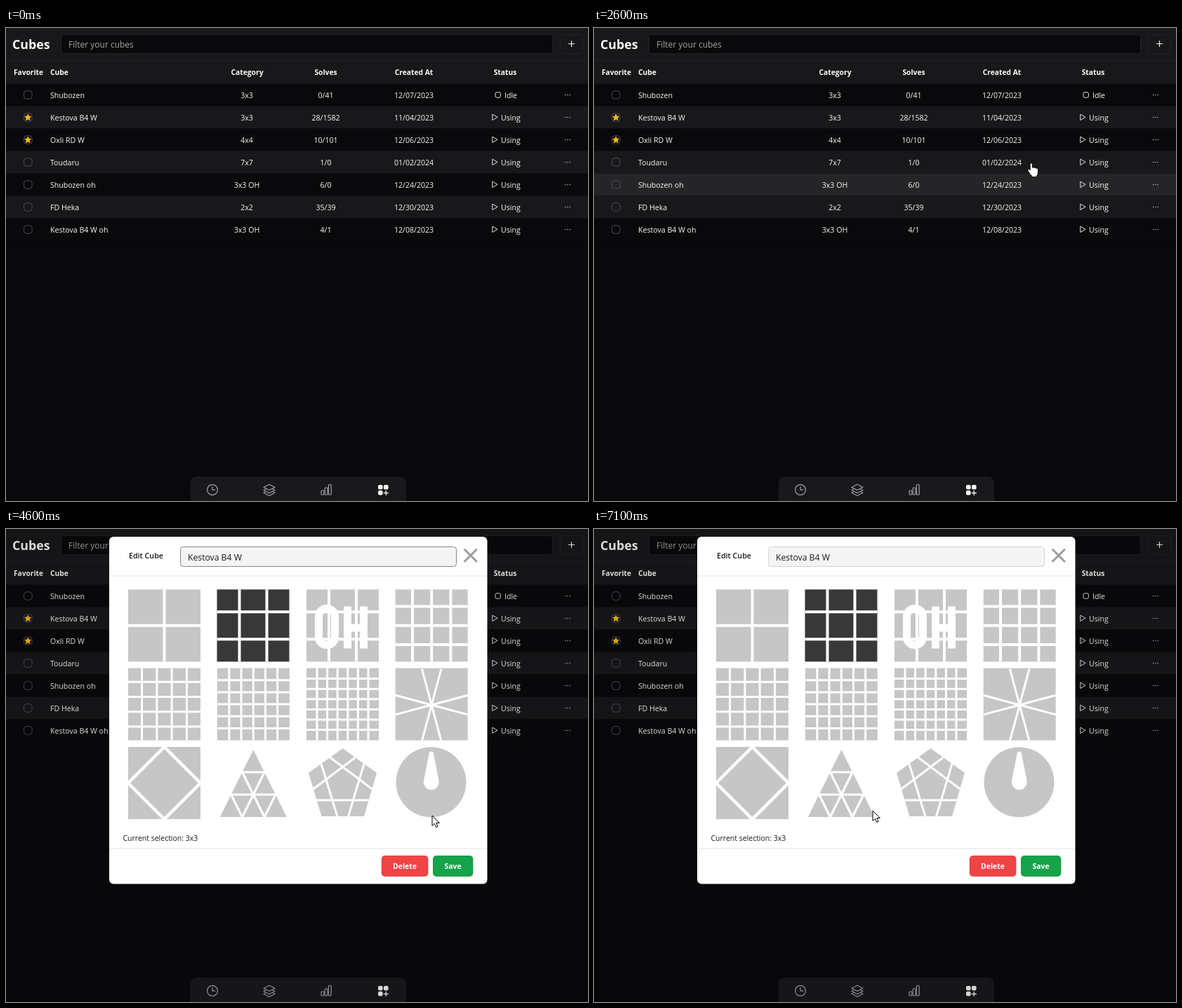
These frames come from a looping animation (829 by 675 pixels, 7200 ms). An HTML page:

```html
<!DOCTYPE html>
<html lang="en">
<head>
<meta charset="utf-8">
<title>Cubes</title>
<style>
  html, body { margin: 0; width: 100%; height: 100%; overflow: hidden; background: #09090b; }
  svg { display: block; }
  text { font-family: "Open Sans", "Noto Sans", sans-serif; font-weight: 500; fill: #fafafa; white-space: pre; }
  .thin { font-weight: 400; }
  .b { font-weight: 600; }
  .bb { font-weight: 700; }
  .mid { text-anchor: middle; }
  .end { text-anchor: end; }
  .dark text { fill: #18181b; font-weight: 400; }
  .dark .b { font-weight: 600; }
  .dark .light { fill: #fff; font-weight: 700; }
  .mono { font-family: "DejaVu Sans Mono", monospace; }
  .line { fill: none; stroke-linecap: round; stroke-linejoin: round; }
  .gap { fill: none; stroke: #fff; }
  .tile { fill: #c6c6c6; }
</style>
</head>
<body>
<svg id="stage" width="829" height="675" viewBox="0 0 829 675">
  <g id="page"></g>
  <rect id="dim" width="829" height="675"/>
  <g id="modal" class="dark"></g>
  <g id="alert" class="dark"></g>
  <g id="cursor"></g>
</svg>
<script>
const $ = id => document.getElementById(id);
const LOOP = 7200, STEP = 100;
const NAME = 'Kestova B4 W';

// --- markup helpers ---
const rect = (x, y, w, h, fill, r = 0, more = '') =>
  `<rect x="${x}" y="${y}" width="${w}" height="${h}" rx="${r}" fill="${fill}" ${more}/>`;
const text = (x, y, s, cls = '', size = 10.6, more = '') =>
  `<text x="${x}" y="${y}" class="${cls}" style="font-size:${size}px" ${more}>${s}</text>`;
const line = (d, color, w = 1, more = '') =>
  `<path class="line" d="${d}" stroke="${color}" stroke-width="${w}" ${more}/>`;
const gap = (d, w) => `<path class="gap" d="${d}" stroke-width="${w}"/>`;
const shape = pts => `<polygon class="tile" points="${pts.join(' ')}"/>`;
const mix = (a, b, k) => a.map((v, i) => v + (b[i] - v) * k);

// --- table page ---
const ROW_TOP = 79.5, ROW_H = 32;
const rowFill = i => i % 2 ? '#18181b' : '#09090b';
const cubes = [
  ['Shubozen', '3x3', '0/41', '12/07/2023'],
  [NAME, '3x3', '28/1582', '11/04/2023', true],
  ['Oxli RD W', '4x4', '10/101', '12/06/2023', true],
  ['Toudaru', '7x7', '1/0', '01/02/2024'],
  ['Shubozen oh', '3x3 OH', '6/0', '12/24/2023'],
  ['FD Heka', '2x2', '35/39', '12/30/2023'],
  [NAME + ' oh', '3x3 OH', '4/1', '12/08/2023'],
];

function star(cx, cy, r) {
  const pts = Array.from({ length: 10 }, (_, k) => {
    const a = k * Math.PI / 5 - Math.PI / 2, q = k % 2 ? r * 0.48 : r;
    return (cx + q * Math.cos(a)).toFixed(2) + ',' + (cy + q * Math.sin(a)).toFixed(2);
  });
  return `<polygon points="${pts.join(' ')}" fill="#f2b90c" stroke="#f2b90c" stroke-linejoin="round"/>`;
}

function tableRow([name, category, solves, date, fav], i) {
  const y = ROW_TOP + ROW_H * i, c = y + 16, base = c + 4;
  const dots = [-3.3, 0, 3.3].map(d => `<circle cx="${800 + d}" cy="${c}" r=".8" fill="#b4b4bb"/>`).join('');
  return rect(0, y, 829, ROW_H, rowFill(i), 0, `id="row${i}"`)
    + rect(25.5, c - 5.8, 11.6, 11.6, 'none', 4, 'stroke="#4b4b52"')
    + (fav ? star(31.2, c + .3, 4.6) : '')
    + text(63, base, name)
    + text(343, base, category, 'mid') + text(455.5, base, solves, 'mid') + text(581, base, date, 'mid')
    + (i ? line(`M692.8 ${c - 4}v8l7-4z`, '#e4e4e7') + text(705, base, 'Using')
         : rect(697, c - 3.7, 7.4, 7.4, 'none', 1.8, 'stroke="#e4e4e7"') + text(710, base, 'Idle'))
    + rect(787, c - 10, 26, 20, '#484850', 5, `id="more${i}" visibility="hidden"`)
    + dots;
}

function navBar() {
  const gray = '#a1a1aa';
  const bars = [[449, 660, 6], [454.2, 656, 10], [459.4, 651.5, 14.5]]
    .map(([x, y, h]) => rect(x, y, 3.8, h, 'none', 1, `stroke="${gray}" stroke-width="1.2"`)).join('');
  const blocks = [[530, 652], [538, 652], [530, 660]].map(([x, y]) => rect(x, y, 6.6, 6.6, '#f4f4f5', 2)).join('');
  return '<path d="M262.5 675V651q0-11 11-11H559q11 0 11 11V675z" fill="#19191c"/>'
    + `<circle cx="294" cy="659" r="7.4" fill="none" stroke="${gray}" stroke-width="1.2"/>`
    + line('M294 654.5v4.7h3.8', gray, 1.2)
    + line('M375 651.2l8 4.2-8 4.2-8-4.2zM370 658.1l-3 1.5 8 4.2 8-4.2-3-1.5M370 661.6l-3 1.6 8 4.2 8-4.2-3-1.6', gray, 1.1)
    + bars + blocks + line('M541.3 660.5v6M538.3 663.5h6', '#f4f4f5', 1.3);
}

$('page').innerHTML = rect(0, 0, 829, 675, '#09090b') + rect(0, 0, 829, 80, '#18181b')
  + rect(0, 46, 829, 1, '#232327')
  + text(9, 30, 'Cubes', 'bb', 17.8)
  + rect(78.5, 9.5, 700, 27, '#09090b', 4, 'stroke="#222226"')
  + text(89, 28, 'Filter your cubes', 'thin', 12, 'fill-opacity=".65"')
  + rect(789.5, 9.5, 32, 27, '#18181b', 4, 'stroke="#232327"')
  + line('M805.5 18.5v8M801.5 22.5h8', '#f4f4f5', 1.2)
  + text(11, 67, 'Favorite', 'bb', 10.2) + text(63, 67, 'Cube', 'bb', 10.3)
  + [[343.5, 'Category'], [455.5, 'Solves'], [581, 'Created At'], [711, 'Status']]
      .map(([x, s]) => text(x, 67, s, 'bb mid', 10.3)).join('')
  + cubes.map(tableRow).join('') + navBar();

// --- edit window ---
const TILE = 103;

function gridTile(x, y, n, pitch, w, color = '#c6c6c6') {
  let d = '';
  for (let k = 1; k < n; k++) {
    const o = TILE / 2 + (k - n / 2) * pitch;
    d += `M${x + o} ${y}v${TILE}M${x} ${y + o}h${TILE}`;
  }
  return rect(x, y, TILE, TILE, color) + gap(d, w);
}

function sliceTile(x, y) {
  const h = TILE / 2, q = h * Math.tan(Math.PI / 12);
  const d = [[q, h], [-q, h], [h, q], [h, -q]]
    .map(([a, b]) => `M${x + h - a} ${y + h + 1 - b}l${2 * a} ${2 * b}`).join('');
  return rect(x, y, TILE, TILE, '#c6c6c6') + gap(d, 3);
}

function diamondTile(x, y) {
  const h = TILE / 2;
  return rect(x, y, TILE, TILE, '#c6c6c6') + gap(`M${x + h} ${y}l${h} ${h}l${-h} ${h}l${-h} ${-h}z`, 4.5);
}

function triangleTile() {
  const A = [352.3, 315], B = [399.8, 411], C = [304.8, 411];
  let d = '';
  for (const k of [1 / 3, 2 / 3])
    for (const [p, q, r] of [[A, B, C], [B, C, A], [C, A, B]]) d += `M${mix(p, q, k)}L${mix(p, r, k)}`;
  return shape([A, B, C]) + gap(d, 3.2);
}

function pentagonTile() {
  const v = [[479.5, 313], [528, 348], [510, 410], [449.5, 410], [431, 348]];
  const at = i => v[(i + 5) % 5];
  const d = v.map((p, i) => `M${mix(p, at(i - 1), .37)}L${mix(at(i + 1), at(i + 2), .37)}`).join('');
  return shape(v) + gap(d, 3);
}

const OH = '<rect class="gap" x="445.5" y="113.5" width="23" height="52" rx="11" stroke-width="11"/>'
  + gap('M486.5 110.5v60M509.5 110.5v60M486.5 141h23', 11);

const dial = '<circle class="tile" cx="605.5" cy="361.3" r="50"/>'
  + '<path d="M602.6 320.5q.4-3 3.2-3t3.2 3l7.8 39.5a11 12.2 0 1 1-22 0z" fill="#fff"/>';

$('modal').innerHTML = rect(147, 11, 538.5, 495.5, '#fff', 6)
  + rect(147, 66.5, 538, 1, '#e4e4e7') + rect(147, 455.5, 538, 1, '#e4e4e7')
  + text(175, 42, 'Edit Cube', 'b', 10.7)
  + rect(248.5, 25.5, 393, 28, '#f4f4f5', 4, 'id="field"')
  + text(259, 45, NAME, '', 12.2, 'id="fieldText"')
  + rect(339, 32, 1, 16, '#18181b', 0, 'id="caret"')
  + line('M653.5 29.5l16.5 16.5M670 29.5l-16.5 16.5', '#9b9ba1', 3)
  + gridTile(174, 86.3, 2, 0, 4) + gridTile(300.5, 86.3, 3, 39, 4, '#383838')
  + gridTile(428, 86.3, 3, 39, 4) + OH + gridTile(554.7, 86.3, 4, 27.2, 4)
  + gridTile(174, 198.6, 5, 21.3, 3) + gridTile(300.8, 198.6, 6, 17.2, 3)
  + gridTile(428, 198.6, 7, 14.6, 3) + sliceTile(554.7, 198.6)
  + diamondTile(174, 311) + triangleTile() + pentagonTile() + dial
  + text(166.5, 445, 'Current selection: 3x3', '', 10.5)
  + rect(534.8, 466, 66.6, 30, '#ef4444', 5, 'id="delete"') + text(568, 485, 'Delete', 'mid light', 10.4)
  + rect(608, 466, 57.4, 30, '#16a34a', 5) + text(636.5, 485, 'Save', 'mid light', 10.4);

// caret follows the end of the typed name
const placeCaret = () => $('caret').setAttribute('x', Math.round(259 + $('fieldText').getComputedTextLength()));

// --- confirmation ---
const facts = [['Category:', '3x3'], ['Best time:', '8.84'], ['Best Ao5:', '11.14'], ['Counter:', '1610']];
$('alert').innerHTML = rect(0, 0, 829, 675, '#18181a', 0, 'opacity=".75"')
  + rect(262, 221, 308, 234.5, '#fff', 6)
  + text(415.7, 247.5, 'Are you sure you want to delete?', 'b mid', 13.4)
  + rect(367.3, 263.3, 97.2, 18.9, '#fddf3f') + text(416, 276.8, NAME, 'mono mid', 11.9)
  + facts.map(([k, v], i) => text(425, 306 + 19.3 * i, k, 'end', 12.2) + text(431.5, 306 + 19.3 * i, v, '', 12.1)).join('')
  + text(415.5, 389, 'This irreversible action will delete all solve history for this cube', 'mid', 9.13)
  + text(415.5, 401.5, 'and may impact your statistics.', 'mid', 9.13)
  + rect(340.5, 413.5, 66, 32, '#e3e3e5', 6) + text(373.3, 434, 'Cancel', 'mid', 10.9)
  + rect(416, 413.5, 74.7, 32, '#ef4444', 6) + text(453.2, 434, 'Confirm', 'mid light', 10.5);

// --- pointer ---
$('cursor').innerHTML =
  '<path id="arrow" d="M0 0v14.5l3.4-3.1 2.3 5.2 2.4-1-2.3-5.1h4.6z" fill="#fff" stroke="#000" stroke-width="1"/>'
  + '<path id="hand" d="M-1.8 1.6q0-1.8 1.6-1.8t1.6 1.8v5q.3-.9 1.5-.9 1.3 0 1.5 1.2.4-.6 1.4-.6 1.2 0 1.4 1.3.3-.4 1-.4 1.4 0 1.4 1.6v4q0 3-1.8 5v1.6h-7.4v-1.5q-2.2-2-3.8-4.8-1.5-2.4-1.7-3.6-.1-1.2 1.1-1.2 1 0 2.2 1.7z" fill="#fff" stroke="#000" stroke-width=".9"/>';

// [time, x, y] of the pointer tip
const path = [
  [900, 541, 676], [1500, 556, 132], [1700, 550, 139], [1800, 545, 155], [2300, 578, 252],
  [2900, 668, 134], [3400, 800, 128], [3700, 800, 128], [3800, 797, 128], [4100, 797, 128],
  [4800, 560, 479], [5400, 557, 477], [5600, 548, 468], [6000, 361, 313],
  [6400, 374, 427], [6600, 374, 428], [7100, 397, 402],
];

function pointer(t) {
  if (t < path[0][0]) return null;
  const i = path.findIndex(p => p[0] > t);
  if (i < 0) return path[path.length - 1].slice(1);
  const a = path[i - 1], b = path[i], u = (t - a[0]) / (b[0] - a[0]);
  return mix(a.slice(1), b.slice(1), u * u * (3 - 2 * u));
}

// opacity ramp between two times
const ramp = (t, a, b) => Math.min(1, Math.max(0, (t - a) / (b - a)));
const show = (id, on) => $(id).setAttribute('visibility', on ? 'visible' : 'hidden');
// an inner visibility must not override a hidden group, so only groups without one are faded
const fade = (id, k) => { $(id).setAttribute('opacity', k); show(id, k > 0); };

const OPEN = 3700, ASK = 5500;

function draw(t) {
  const editing = t >= OPEN, p = pointer(t), prev = pointer(t - STEP);

  // row highlight trails the pointer by one step
  const hot = prev && !editing ? Math.floor((prev[1] - ROW_TOP) / ROW_H) : -1;
  cubes.forEach((_, i) => {
    $('row' + i).setAttribute('fill', i === hot ? '#252528' : rowFill(i));
    show('more' + i, i === hot && prev[0] > 787);
  });

  const opened = 1 - (1 - ramp(t, OPEN - 50, OPEN + 200)) ** 3.2;
  fade('dim', .12 * opened);
  fade('modal', opened);
  const asking = ramp(t, ASK - 60, ASK + 100) * (1 - ramp(t, 6540, 6700));
  fade('alert', asking);

  const focus = t < ASK;
  $('field').setAttribute('stroke', focus ? '#85858a' : '#d4d4d8');
  $('caret').setAttribute('opacity', editing && focus && Math.floor((t - OPEN) / 500) % 2 === 0 ? 1 : 0);
  const onDelete = p && t < ASK && p[0] > 535 && p[0] < 601 && p[1] > 466;
  $('delete').setAttribute('fill', onDelete ? '#d93030' : '#ef4444');

  show('arrow', p && editing);
  show('hand', p && !editing);
  if (p) $('cursor').setAttribute('transform', `translate(${Math.round(p[0])} ${Math.round(p[1])})`);
}

placeCaret();
const start = performance.now();
function tick() {
  const t = (performance.now() - start) % LOOP;
  draw(Math.floor(t / STEP) * STEP);
  requestAnimationFrame(tick);
}
tick();
</script>
</body>
</html>
```
